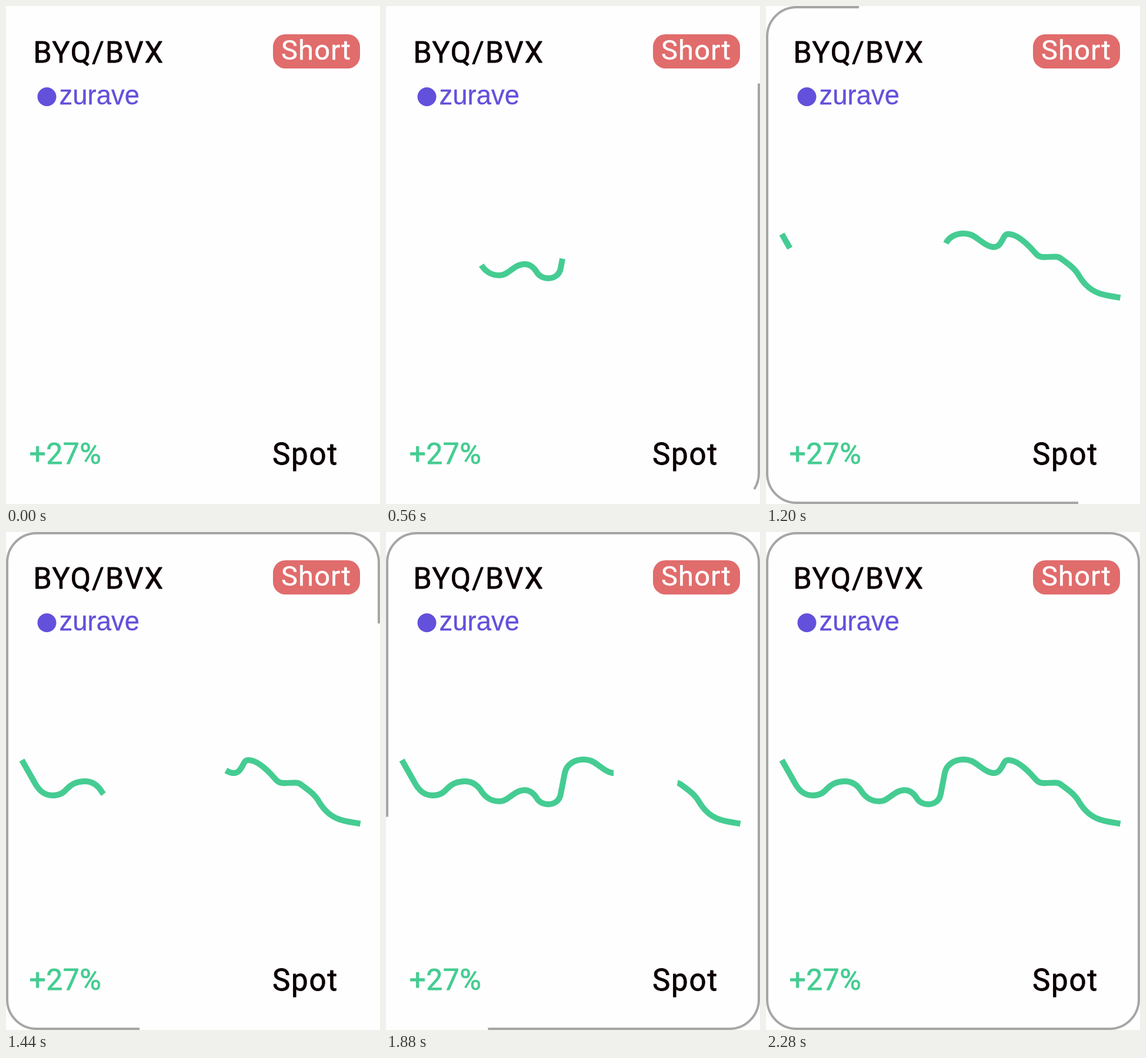
Animation of 636 by 845 pixels, one loop 2320 ms. Source, as an HTML page:

```html
<!DOCTYPE html>
<html lang="en">
<head>
<meta charset="utf-8">
<title>Trade card</title>
<style>
  html, body { margin: 0; width: 100%; height: 100%; overflow: hidden; background: #fefefe; }
  svg { display: block; width: 100vw; height: 100vh; }
  text {
    font-family: Roboto, Arial, sans-serif;
    fill: currentColor; stroke: currentColor;
    stroke-width: 0.8; stroke-linejoin: round;
  }
  .ink { color: #0d0003; }
  .brand { color: #6350db; font-family: 'Liberation Sans', Arial, sans-serif; stroke-width: 0.3; }
  .badge { color: #fff; stroke-width: 0.5; }
  .gain { color: #45cc92; }
  .trace { fill: none; }
</style>
</head>
<body>
<svg viewBox="0 0 636 845">
  <rect class="trace" x="2" y="2" width="632" height="841" rx="50" pathLength="1"
        stroke="#a6a6a6" stroke-width="4"/>

  <text class="ink" x="46.5" y="96" font-size="50" letter-spacing="2.1">BYQ/BVX</text>
  <circle cx="69.5" cy="154" r="16" fill="#6350db"/>
  <text class="brand" x="90.5" y="166.5" font-size="45.5">zurave</text>

  <rect x="454" y="48" width="148" height="58" rx="21" fill="#e16c6c"/>
  <text class="badge" x="468" y="91" font-size="47" letter-spacing="1.2">Short</text>

  <path class="trace" pathLength="1" stroke="#45cc92" stroke-width="10" d="
    M27 387 L48 424 C56 439 65 447 80 447
    C91 447 97 443 104 435.5 C112 427 122 423 134 423
    C148 423 157 431 163 441 C170 451 179 457 193 457
    C209 457 217 438 236 438
    C245 438 251 443 256 451 C260 458 267 462 276 462
    C286 462 295 456 297 445 L304 409 C307 394 321 386 336 386
    C346 386 352 389 360 395 C371 403 379 409 387 409
    C395 409 398 404 402 397 C405 391 407 387 412 387
    C427 387 443 402 457 418 C462 424 465 426 474 426
    C482 426 488 425 492 425.5 C498 425 501 428 505 431
    C514 438 522 442 530 454 C537 466 547 481 568 488
    C580 492 590 492.5 602.5 495"/>

  <text class="gain" x="39.5" y="777" font-size="50" letter-spacing="0.4">+27%</text>
  <text class="ink" x="453" y="778" font-size="51" letter-spacing="1.8">Spot</text>
</svg>
<script>
  const LOOP = 2320, STEP = 40, LAST = LOOP - STEP;
  const traces = document.querySelectorAll('.trace');
  const start = performance.now();

  // Nearly linear progress with a slight lag mid-loop
  function progress(time) {
    const x = Math.floor(time / STEP) * STEP / LAST;
    return x - 0.0078 * Math.max(0, Math.sin(Math.PI * x)) ** 1.6;
  }

  // One dash covers p to 2p of each outline, wrapping past the end
  function draw(time) {
    const p = progress(time);
    for (const trace of traces) {
      trace.style.visibility = p > 0 ? 'visible' : 'hidden';
      trace.setAttribute('stroke-dasharray', p < 0.9999 ? `${p} ${1 - p}` : 'none');
      trace.setAttribute('stroke-dashoffset', -p);
    }
  }

  function tick() {
    draw((performance.now() - start) % LOOP);
    requestAnimationFrame(tick);
  }
  tick();
</script>
</body>
</html>
```
